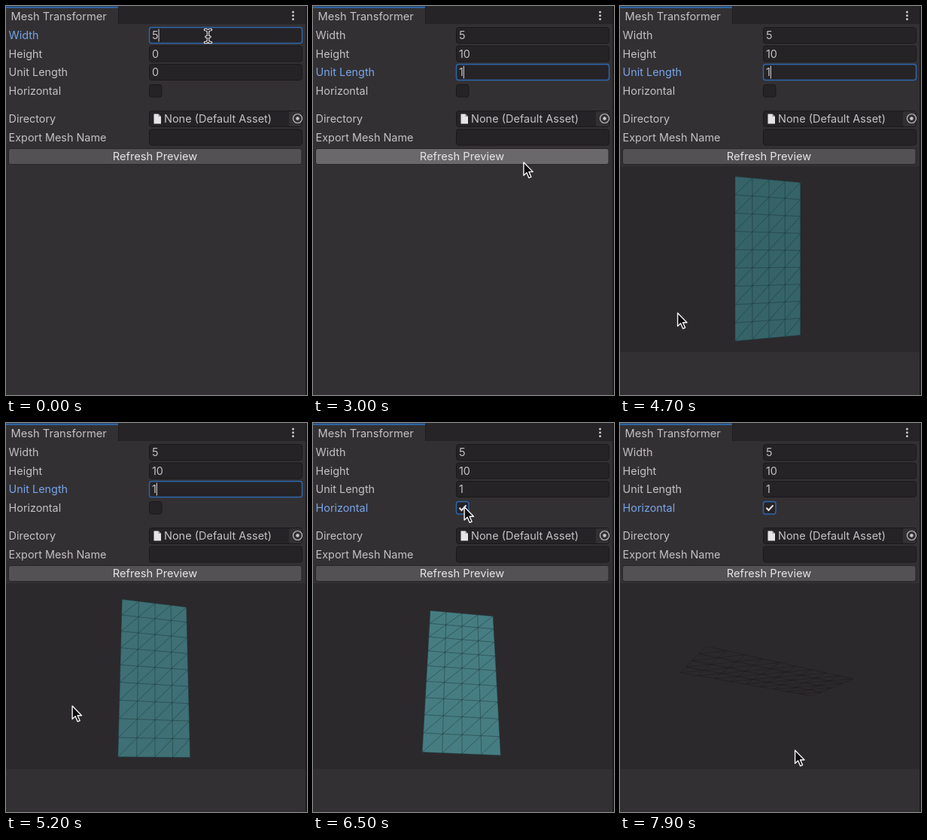
An HTML page for the animation above (8000 ms loop, 400 px wide and 517 px high).

```html
<!DOCTYPE html>
<html lang="en">
<head>
<meta charset="utf-8">
<title>Mesh Transformer</title>
<style>
html, body { margin: 0; width: 100%; height: 100%; overflow: hidden; background: #333033; }
svg { display: block; width: 100vw; height: 100vh; }
text { font: 14.4px Inter, Roboto, sans-serif; fill: #c3c1c3; white-space: pre; }
text.head { font-size: 14.65px; }
text.on { fill: #76a5ea; }
.box { fill: #262327; stroke: #1a181a; }
.box.on { stroke: #2d68ad; stroke-width: 1.4; }
</style>
</head>
<body>
<svg id="stage" viewBox="0 0 400 517" preserveAspectRatio="none"></svg>
<script>
const LOOP = 8000, STEP = 100;
const stage = document.getElementById('stage');

function add(tag, attrs, content) {
  const el = document.createElementNS('http://www.w3.org/2000/svg', tag);
  for (const key in attrs) el.setAttribute(key, attrs[key]);
  if (content !== undefined) el.textContent = content;
  stage.appendChild(el);
  return el;
}
const rect = (x, y, width, height, attrs) => add('rect', { x, y, width, height, ...attrs });
const label = (x, y, s, attrs) => add('text', { x, y, ...attrs }, s);
const path = (d, attrs) => add('path', { d, ...attrs });
const show = (el, on) => el.setAttribute('visibility', on ? 'visible' : 'hidden');
const field = y => rect(190.5, y - 10.5, 203, 21, { rx: 3, class: 'box' });

// Window frame and tab
rect(0, 0, 400, 517, { fill: '#333033' });
rect(0, 0, 400, 24, { fill: '#262427' });
rect(0, 1, 149, 24, { fill: '#333033' });
rect(0, 0.6, 149, 2.2, { fill: '#2d68ab' });
rect(149, 2, 1, 22, { fill: '#1d1b1d' });
label(6.5, 19.3, 'Mesh Transformer', { class: 'head' });
for (const y of [8, 12.7, 17.4]) add('circle', { cx: 381.5, cy: y, r: 1.5, fill: '#c9c7c9' });

// Number fields
const rows = [['Width', 39], ['Height', 63.5], ['Unit Length', 88]].map(([name, y]) => ({
  y,
  name: label(3.6, y + 5, name),
  box: field(y),
  mark: rect(194, y - 9, 11, 18, { fill: '#38689e' }),
  value: label(194, y + 5, '0'),
  caret: rect(0, y - 8.5, 1, 17, { fill: '#dcdadc' })
}));

// Checkbox
const flatLabel = label(3.6, 118, 'Horizontal');
const flatBox = rect(190.5, 104.5, 16.5, 16.5, { rx: 3, class: 'box' });
const tick = path('M194.5 112.8l3 3.2 6-6.7', { fill: 'none', stroke: '#e8e6e8', 'stroke-width': 2 });

// Asset fields
label(3.6, 155, 'Directory');
field(150);
const picker = rect(376, 140, 17, 20, { fill: '#333033', rx: 2 });
path('M196.5 143.5h6l3.5 3.5v9.5h-9.5z', { fill: '#e6e4e6' });
path('M202.5 143.5v3.5h3.5z', { fill: '#9a989a' });
label(210, 155, 'None (Default Asset)', { style: 'font-size:14.5px' });
add('circle', { cx: 387.5, cy: 149.5, r: 6, fill: 'none', stroke: '#bfbdbf', 'stroke-width': 1.2 });
add('circle', { cx: 387.5, cy: 149.5, r: 2.2, fill: '#c9c7c9' });
label(3.6, 179.5, 'Export Mesh Name');
field(174.5);

const button = rect(3.5, 189.5, 389.5, 21, { rx: 3, stroke: '#282528' });
label(198, 205, 'Refresh Preview', { class: 'head', 'text-anchor': 'middle', style: 'fill:#e6e4e6' });

// Mesh preview
const preview = rect(0, 213, 398, 247, { fill: '#2c292c' });
const face = path('', {});
const wires = path('', { fill: 'none', 'stroke-width': 0.8 });
rect(398, 0, 2, 517, { fill: '#1c1a1c' });

// Pointers
const beamShape = 'M264.5 31.5q3.7 0 4 2.5q.3-2.5 4-2.5M264.5 48.5q3.7 0 4-2.5q.3 2.5 4 2.5M268.5 34v12M266 41h5';
const beam = [['#f2f2f2', 3.6], ['#111', 1.3]].map(([stroke, w]) =>
  path(beamShape, { fill: 'none', stroke, 'stroke-width': w, 'stroke-linecap': 'round' }));
const arrow = path('M.6 1v17.5l4-3.7 3 7 3-1.3-3-6.8h5.4z',
  { fill: '#0c0c0c', stroke: '#f4f4f4', 'stroke-width': 1.4, 'stroke-linejoin': 'round' });

// Each key: time, then values
function at(keys, t) {
  if (t <= keys[0][0]) return keys[0].slice(1);
  for (let i = 1; i < keys.length; i++) {
    const a = keys[i - 1], b = keys[i];
    if (t < b[0]) {
      const k = (t - a[0]) / (b[0] - a[0]);
      return a.slice(1).map((v, n) => v + (b[n + 1] - v) * k);
    }
  }
  return keys[keys.length - 1].slice(1);
}
const pointerKeys = [
  [2600, 358, 222], [2800, 358, 222], [3100, 240, 199], [3400, 238, 200],
  [3700, 274, 396], [3900, 208, 378], [4100, 160, 412], [4600, 32, 410],
  [4700, 76, 407], [4900, 100, 400], [5500, 75, 350], [5900, 209, 159],
  [6200, 200, 110], [6800, 201, 111], [7200, 222, 199], [7400, 222, 201],
  [7500, 224, 204], [7700, 231, 362], [7800, 231, 408], [7900, 232, 434]
];
const turnKeys = [
  [3900, 120, 20], [4100, 93, 0], [4600, 22, 0], [4900, 22, 0], [5500, 8, 29]
];

function project(x, y, z, yaw, pitch) {
  const sy = Math.sin(yaw), cy = Math.cos(yaw), sp = Math.sin(pitch), cp = Math.cos(pitch);
  const rx = x * cy - z * sy, rz = x * sy + z * cy;
  const s = 461 / (19.7 + y * sp + rz * cp);
  return [198 + rx * s, 336 - (y * cp - rz * sp) * s];
}

function drawMesh(yawDeg, pitchDeg, flat) {
  const yaw = yawDeg * Math.PI / 180, pitch = pitchDeg * Math.PI / 180;
  const pt = (i, j) => flat ? project(i - 2, 0, j - 4.5, yaw, pitch)
                            : project(i - 2, j - 4.5, 0, yaw, pitch);
  const xy = p => p.map(v => v.toFixed(2)).join(' ');
  const line = (a, b, c, d) => `M${xy(pt(a, b))}L${xy(pt(c, d))}`;
  const corners = [pt(0, 0), pt(4, 0), pt(4, 9), pt(0, 9)];
  const [a, b, , d] = corners;
  const front = (b[0] - a[0]) * (d[1] - a[1]) - (b[1] - a[1]) * (d[0] - a[0]) < 0;

  let grid = '';
  for (let i = 0; i <= 4; i++) grid += line(i, 0, i, 9);
  for (let j = 0; j <= 9; j++) grid += line(0, j, 4, j);
  for (let i = 0; i < 4; i++)
    for (let j = 0; j < 9; j++) grid += line(i, j, i + 1, j + 1);
  wires.setAttribute('d', grid);
  wires.setAttribute('stroke', front ? 'rgba(24,48,52,.58)' : 'rgba(28,26,28,.62)');

  face.setAttribute('d', 'M' + corners.map(xy).join('L') + 'z');
  const k = Math.min(1, pitchDeg / 29);
  const tone = [[53, 70], [99, 125], [104, 130]].map(([lo, hi]) => Math.round(lo + (hi - lo) * k));
  face.setAttribute('fill', `rgb(${tone})`);
  show(face, front);
}

function draw(t) {
  const checked = t >= 6300, flat = t >= 7500, built = t >= 3400;
  const focus = t < 100 ? 0 : t < 1300 ? 1 : checked ? -1 : 2;
  const values = ['5', t < 300 ? '0' : t < 500 ? '1' : '10', t < 2200 ? '0' : '1'];

  rows.forEach((row, i) => {
    const on = i === focus, picked = on && values[i] === '0';
    row.name.setAttribute('class', on ? 'on' : '');
    row.box.setAttribute('class', on ? 'box on' : 'box');
    row.value.textContent = values[i];
    show(row.mark, picked);
    show(row.caret, on && !picked);
    row.caret.setAttribute('x', 194 + row.value.getComputedTextLength());
  });
  flatLabel.setAttribute('class', checked ? 'on' : '');
  flatBox.setAttribute('class', checked ? 'box on' : 'box');
  show(tick, checked);

  const [px, py] = at(pointerKeys, t), pointing = t >= 2600;
  const over = (x, y, w, h) => pointing && px >= x && px <= x + w && py >= y && py <= y + h;
  arrow.setAttribute('transform', `translate(${px} ${py})`);
  show(arrow, pointing);
  beam.forEach(el => {
    show(el, t < 1100);
    el.setAttribute('transform', t >= 1000 ? 'translate(70 -16)' : '');
  });
  button.setAttribute('fill', over(3, 189, 390, 22) ? '#6a686a' : '#535153');
  show(picker, !over(190, 140, 203, 20));

  show(preview, built);
  show(wires, built);
  if (!built) show(face, false);
  else if (flat) drawMesh(120, 20, true);
  else drawMesh(...at(turnKeys, t), false);
}

const start = performance.now();
function tickFrame() {
  const t = (performance.now() - start) % LOOP;
  draw(Math.floor(t / STEP) * STEP);
  requestAnimationFrame(tickFrame);
}
tickFrame();
</script>
</body>
</html>
```
